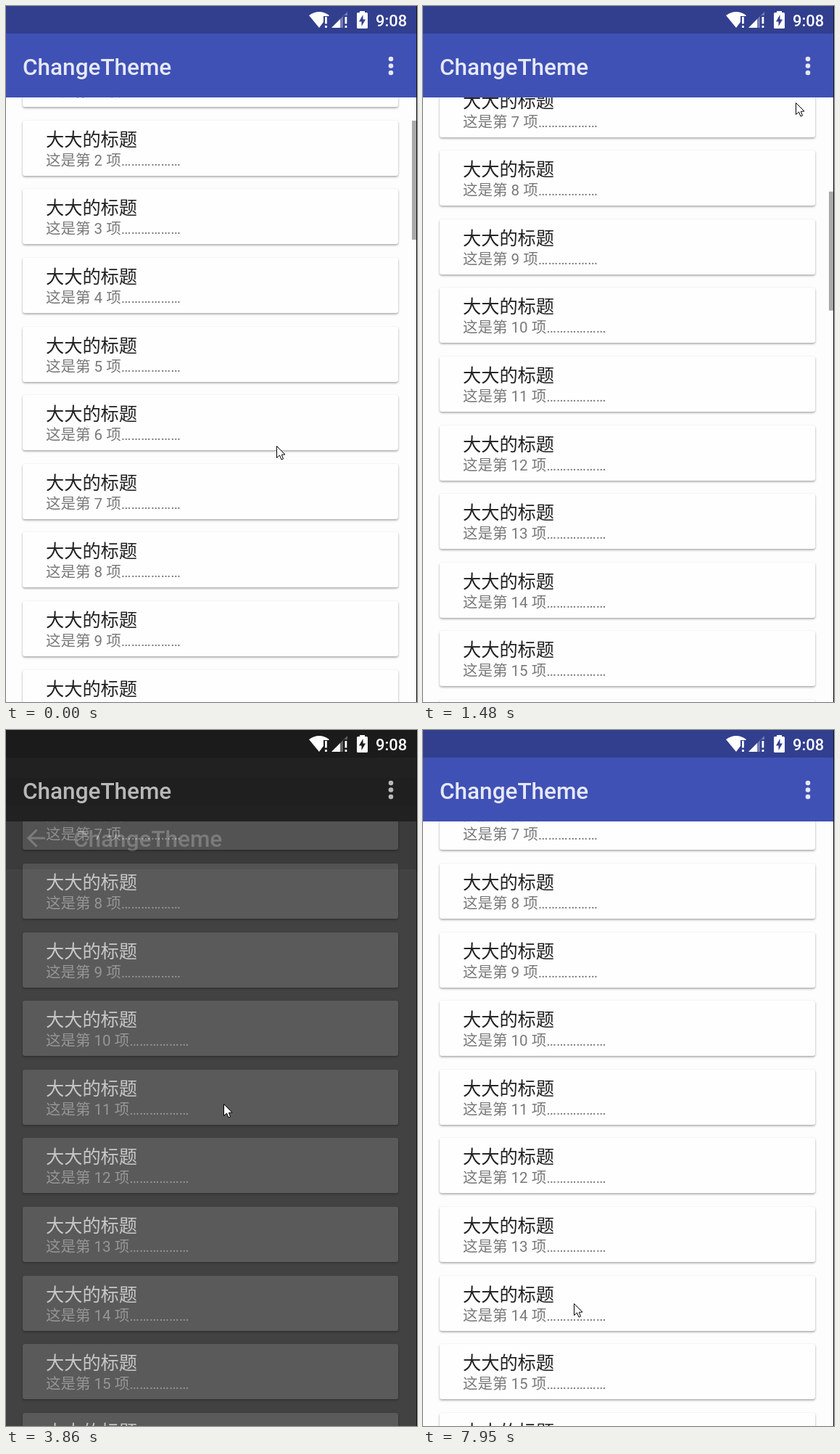
An HTML page with a canvas that plays this animation: 567x959 px, repeating every 8 s.

```html
<!DOCTYPE html>
<html lang="zh-CN">
<head>
<meta charset="utf-8">
<title>ChangeTheme</title>
<style>
html, body { margin: 0; width: 100%; height: 100%; overflow: hidden; background: #fdfdfd; }
canvas { display: block; }
</style>
</head>
<body>
<canvas id="stage" width="567" height="959"></canvas>
<script>
const W = 567, H = 959, LOOP = 8000;
const STATUS_H = 38, BAR_END = 126, PITCH = 94.6;
const FONT = 'Roboto, "Noto Sans CJK SC", "Noto Sans CJK", sans-serif';

const DAY = {
  status: '#323f8f', bar: '#3f51b5', bg: '#fdfdfd', card: '#fefefe',
  title: '#212121', sub: '#797979', shadow: 'rgba(0,0,0,.36)'
};
const NIGHT = {
  status: '#1b1b1b', bar: '#212121', bg: '#424242', card: '#616161',
  title: '#ebebeb', sub: '#acacac', shadow: 'rgba(0,0,0,.36)'
};

const stage = document.getElementById('stage').getContext('2d');
const layerCanvas = document.createElement('canvas');
layerCanvas.width = W;
layerCanvas.height = H;
const layer = layerCanvas.getContext('2d');

const clamp = v => Math.max(0, Math.min(1, v));
const span = (t, from, length) => clamp((t - from) / length);
const mix = (a, b, k) => a + (b - a) * k;
const easeInOut = k => (1 - Math.cos(Math.PI * k)) / 2;
const easeOut = (k, power) => 1 - (1 - k) ** power;

// Pointer tip: time, x, y
const POINTER = [
  [0, 373, 606], [60, 373, 606], [660, 346, 472], [680, 346, 468], [870, 350, 240],
  [1100, 400, 200], [1480, 514, 133], [1640, 530, 91], [1760, 536, 70],
  [2100, 536, 70], [2300, 340, 94], [2640, 340, 94], [3020, 384, 398],
  [3410, 310, 500], [3620, 300, 515], [3960, 300, 515], [4530, 40, 88],
  [4770, 40, 88], [4890, 118, 231], [5540, 495, 198], [5900, 540, 77],
  [6210, 540, 77], [6430, 330, 104], [6720, 330, 104], [7950, 208, 790], [8000, 208, 790]
];

function pointerAt(t) {
  const i = Math.max(1, POINTER.findIndex(p => p[0] >= t));
  const a = POINTER[i - 1], b = POINTER[i];
  const k = span(t, a[0], b[0] - a[0]);
  return [mix(a[1], b[1], k), mix(a[2], b[2], k)];
}

// Top edge of card 8: settle, drag, then fling
function listTop(t) {
  if (t < 680) return mix(725.3, 720, easeOut(span(t, 40, 500), 2));
  if (t < 870) return mix(720, 490, span(t, 680, 190));
  return mix(490, 184, easeOut(span(t, 870, 770), 1.9));
}

function text(c, str, x, y, size, color, weight = 400) {
  c.font = `${weight} ${size}px ${FONT}`;
  c.fillStyle = color;
  c.fillText(str, x, y);
}

function box(c, x, y, w, h, color) {
  c.fillStyle = color;
  c.fillRect(x, y, w, h);
}

function poly(c, points) {
  c.beginPath();
  points.forEach(([x, y]) => c.lineTo(x, y));
  c.closePath();
}

function panel(c, x, y, w, h, r, color, shadow, blur, drop) {
  c.save();
  if (shadow) {
    c.shadowColor = shadow;
    c.shadowBlur = blur;
    c.shadowOffsetY = drop;
  }
  c.fillStyle = color;
  c.beginPath();
  c.roundRect(x, y, w, h, r);
  c.fill();
  c.restore();
}

function appBar(c, theme, titleX) {
  box(c, 0, 0, W, STATUS_H, theme.status);
  box(c, 0, STATUS_H, W, BAR_END - STATUS_H, theme.bar);
  text(c, 'ChangeTheme', titleX, 95, 31.5, 'rgba(255,255,255,.87)', 500);
}

function listPage(c, theme, top8, scrollbar, shadows = true) {
  box(c, 0, 0, W, H, theme.bg);
  for (let n = 0; n < 20; n++) {
    const y = Math.round(top8 + (n - 8) * PITCH);
    if (y < 0 || y > H + 4) continue;
    panel(c, 23, y, 518, 76, 3, theme.card, shadows && theme.shadow, 3, 1.5);
    text(c, '大大的标题', 55, y + 35, 25.2, theme.title);
    text(c, `这是第 ${n} 项${'…'.repeat(6)}`, 55, y + 62, 20.5, theme.sub);
  }
  if (scrollbar > 0) {
    const y = 158 + (725.3 - top8) * .1857;
    box(c, 560, y, 7, 164, `rgba(0,0,0,${.33 * scrollbar})`);
  }
  appBar(c, theme, 23);
  c.fillStyle = 'rgba(255,255,255,.87)';
  for (const y of [73, 82.5, 92]) {
    c.beginPath();
    c.arc(531, y, 3.3, 0, 7);
    c.fill();
  }
}

function detailPage(c) {
  box(c, 0, 0, W, H, NIGHT.bg);
  appBar(c, NIGHT, 93);
  c.strokeStyle = 'rgba(255,255,255,.87)';
  c.lineWidth = 3.1;
  c.beginPath();
  c.moveTo(54, 83);
  c.lineTo(32, 83);
  c.moveTo(42.5, 71.5);
  c.lineTo(31, 83);
  c.lineTo(42.5, 94.5);
  c.stroke();
}

function popup(label, alpha) {
  if (alpha <= 0) return;
  stage.globalAlpha = alpha;
  panel(stage, 250, 44, 310, 76, 3, '#fefefe', 'rgba(0,0,0,.32)', 12, 5);
  text(stage, label, 276, 92, 25.2, '#212121');
  stage.globalAlpha = 1;
}

function blendLayer(alpha, y = 0) {
  stage.globalAlpha = alpha;
  stage.drawImage(layerCanvas, 0, y);
  stage.globalAlpha = 1;
}

// The old look stays on top as a flat copy and fades away
function themeFade(from, to, k, scrollbar) {
  listPage(stage, to, 184, scrollbar);
  listPage(layer, from, 184, 0, false);
  blendLayer(1 - k);
}

function statusIcons(statusColor) {
  const c = stage;
  c.fillStyle = '#fff';
  c.beginPath();
  c.moveTo(418, 13);
  c.quadraticCurveTo(432, 3, 446, 13);
  c.lineTo(445, 14);
  c.lineTo(438, 14);
  c.lineTo(438, 22);
  c.lineTo(432, 30);
  c.fill();
  poly(c, [[449, 30], [461, 18], [461, 30]]);
  c.fill();
  for (const x of [440, 467.5]) {
    c.fillRect(x, 15, 2.8, 9.5);
    c.fillRect(x, 27, 2.8, 3);
  }
  c.fillStyle = 'rgba(255,255,255,.32)';
  poly(c, [[461, 18], [471, 8], [471, 13], [465, 13], [465, 30], [461, 30]]);
  c.fill();
  box(c, 488, 7, 7, 4, '#fff');
  panel(c, 484, 9, 15, 22, 1.5, '#fff');
  c.fillStyle = statusColor;
  poly(c, [[492.5, 12], [487, 21.5], [490.5, 21.5], [490.5, 28], [496, 18.5], [492.5, 18.5]]);
  c.fill();
  text(c, '9:08', 510, 27.5, 22, '#fff', 500);
}

function pointer(t) {
  const [x, y] = pointerAt(t).map(Math.round);
  stage.save();
  stage.translate(x + .5, y + .5);
  poly(stage, [[0, 0], [0, 16], [4, 12.5], [6.5, 18.5], [9, 17.5], [6.8, 11.8], [11.5, 11.5]]);
  stage.fillStyle = '#fff';
  stage.fill();
  stage.strokeStyle = '#000';
  stage.lineWidth = 1;
  stage.stroke();
  stage.restore();
}

function render(t) {
  const toNight = easeInOut(span(t, 2735, 895));
  const toDay = easeInOut(span(t, 6845, 895));

  if (toNight === 0) listPage(stage, DAY, listTop(t), 1 - span(t, 2040, 250));
  else if (toNight < 1) themeFade(DAY, NIGHT, toNight, 1 - span(t, 3160, 250));
  else if (toDay === 0) listPage(stage, NIGHT, 184, 0);
  else if (toDay < 1) themeFade(NIGHT, DAY, toDay, 1 - span(t, 7350, 250));
  else listPage(stage, DAY, 184, 0);

  if (t > 3850 && t < 4995) {
    detailPage(layer);
    const closing = t > 4742;
    const alpha = closing ? 1 - span(t, 4847, 150) : easeOut(span(t, 3850, 200), 4);
    const shift = closing ? span(t, 4742, 250) ** 4 : (1 - span(t, 3850, 350)) ** 5;
    blendLayer(alpha, Math.round(77 * shift));
  }

  popup('夜间模式', span(t, 2040, 220) * (1 - span(t, 2565, 150)));
  popup('日间模式', span(t, 6180, 220) * (1 - span(t, 6675, 150)));
  statusIcons(toNight > .5 && toDay < .5 ? NIGHT.status : DAY.status);
  box(stage, 566, 0, 1, H, '#111');
  pointer(t);
}

const start = performance.now();
function tick() {
  render((performance.now() - start) % LOOP);
  requestAnimationFrame(tick);
}
tick();
</script>
</body>
</html>
```
